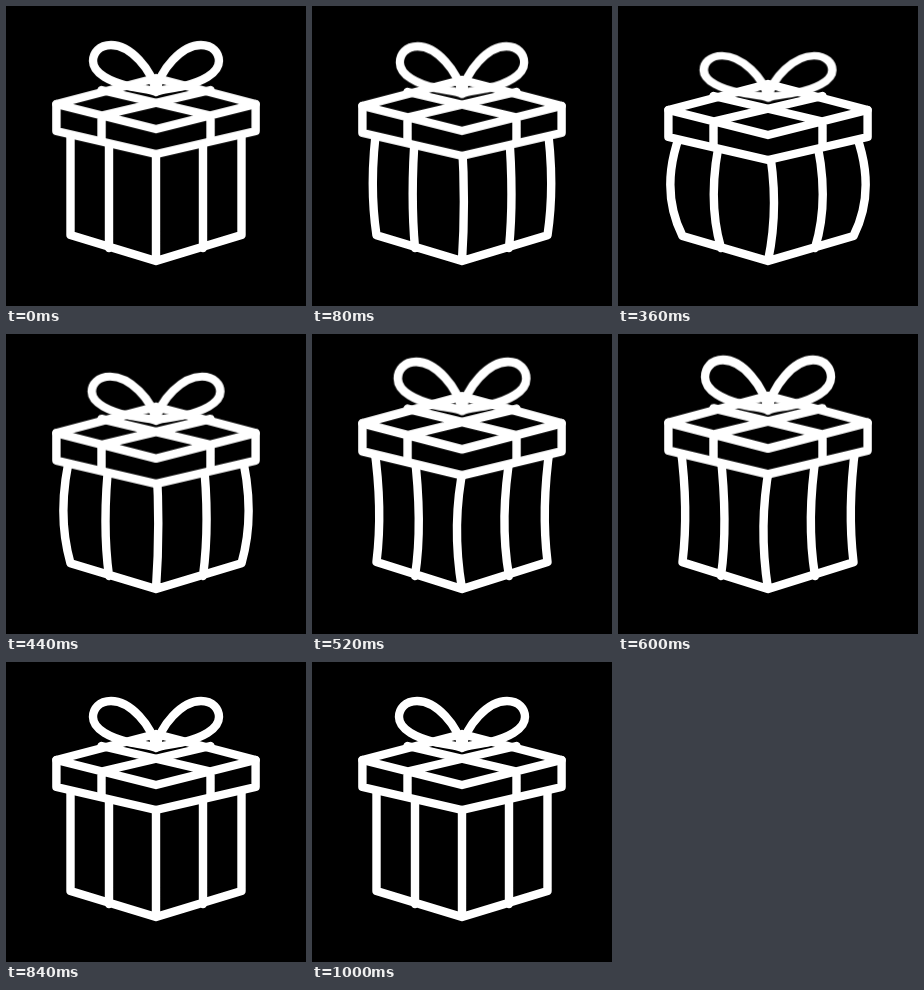
These frames come from a looping animation (300x300 px, 1080 ms). An HTML page without scripts:

```html
<!DOCTYPE html>
<html lang="en">
<head>
<meta charset="utf-8">
<title>Gift box</title>
<style>
html, body { margin: 0; width: 100%; height: 100%; overflow: hidden; background: #000; }
svg { display: block; width: 100vw; height: 100vh; }
path { fill: none; stroke: #fff; stroke-width: 8.4; stroke-linecap: round; stroke-linejoin: round; }
.lid { transform-origin: 150px 98px; }
.lid .face { fill: #000; }
.bow { transform-origin: 150px 86px; }
.lid, .bow, .side { animation: 1.08s linear infinite; }
.lid { animation-name: hop; }
.bow { animation-name: flap; }
.side { animation-name: bulge; }

@keyframes hop {
  0% { transform: translateY(0) scaleY(1); animation-timing-function: ease-in-out; }
  18.52% { transform: translateY(5.5px) scaleY(1); }
  33.33% { transform: translateY(6px) scaleY(1); animation-timing-function: cubic-bezier(.4, 0, .8, .8); }
  48.15% { transform: translateY(-8.5px) scaleY(1.04); animation-timing-function: ease-out; }
  51.85% { transform: translateY(-12px) scaleY(1.04); animation-timing-function: ease-in-out; }
  62.96% { transform: translateY(-1px) scaleY(1); animation-timing-function: ease-out; }
  74.07%, 100% { transform: translateY(0) scaleY(1); }
}
/* the bow rides on the lid, so only its stretch is set here */
@keyframes flap {
  0% { transform: scale(1); animation-timing-function: ease-in-out; }
  18.52% { transform: scale(.96, 1.03); animation-timing-function: ease-in-out; }
  33.33% { transform: scale(1.02, .9); animation-timing-function: ease-in; }
  48.15% { transform: scale(1.02, 1); animation-timing-function: ease-out; }
  51.85% { transform: scale(1, 1.05); animation-timing-function: ease-in-out; }
  62.96% { transform: scale(1, 1.01); }
  74.07%, 100% { transform: scale(1); }
}
@keyframes bulge {
  0% {
    d: path("M64.5 112Q64.5 175 64.5 229L150 255L235.5 229Q235.5 175 235.5 112M150 136Q150 196 150 255M103 122Q103 190 103 242M197 122Q197 190 197 242");
    animation-timing-function: ease-in-out;
  }
  18.52% {
    d: path("M68 114Q41 178 64.5 230L150 255L235.5 230Q259 178 232 114M150 136Q161 196 150 255M104 124Q89 190 103 242M196 124Q212 190 197 242");
  }
  33.33% {
    d: path("M68 114Q38.5 178 64.5 230L150 255L235.5 230Q261.5 178 232 114M150 136Q162 198 150 255M104 124Q88 190 103 242M196 124Q213 190 197 242");
    animation-timing-function: cubic-bezier(.4, 0, .8, .8);
  }
  48.15% {
    d: path("M62 112Q71 175 64.5 228L150 255L235.5 228Q229 175 238 112M152 130Q139 190 150 255M102 116Q111 190 103 242M199 116Q187 185 197 242");
    animation-timing-function: ease-out;
  }
  51.85% {
    d: path("M62 112Q72 175 64.5 228L150 255L235.5 228Q228 175 238 112M152 130Q138 190 150 255M102 116Q112 190 103 242M199 116Q186 185 197 242");
    animation-timing-function: ease-in-out;
  }
  62.96% {
    d: path("M64 112Q67 175 64.5 229L150 255L235.5 229Q233 175 236 112M150 136Q147 196 150 255M103 122Q105 190 103 242M197 122Q194 190 197 242");
    animation-timing-function: ease-out;
  }
  74.07%, 100% {
    d: path("M64.5 112Q64.5 175 64.5 229L150 255L235.5 229Q235.5 175 235.5 112M150 136Q150 196 150 255M103 122Q103 190 103 242M197 122Q197 190 197 242");
  }
}
</style>
</head>
<body>
<svg viewBox="0 0 300 300">
  <path class="side" d="M64.5 112Q64.5 175 64.5 229L150 255L235.5 229Q235.5 175 235.5 112M150 136Q150 196 150 255M103 122Q103 190 103 242M197 122Q197 190 197 242"/>
  <g class="lid">
    <path class="face" d="M50.4 98L150 72L249.6 98V125L150 148L50.4 125Z"/>
    <path d="M50.4 98L150 123L249.6 98M95.5 134V109.5L204.5 84M204.5 134V109.5L95.5 84"/>
    <path class="bow" d="M150 86C146 63 124 39 105 39C93 39 87 47 87 55C87 68 106 76 122 80C134 83 145 83 150 86C155 83 166 83 178 80C194 76 213 68 213 55C213 47 207 39 195 39C176 39 154 63 150 86Z"/>
  </g>
</svg>
</body>
</html>
```
